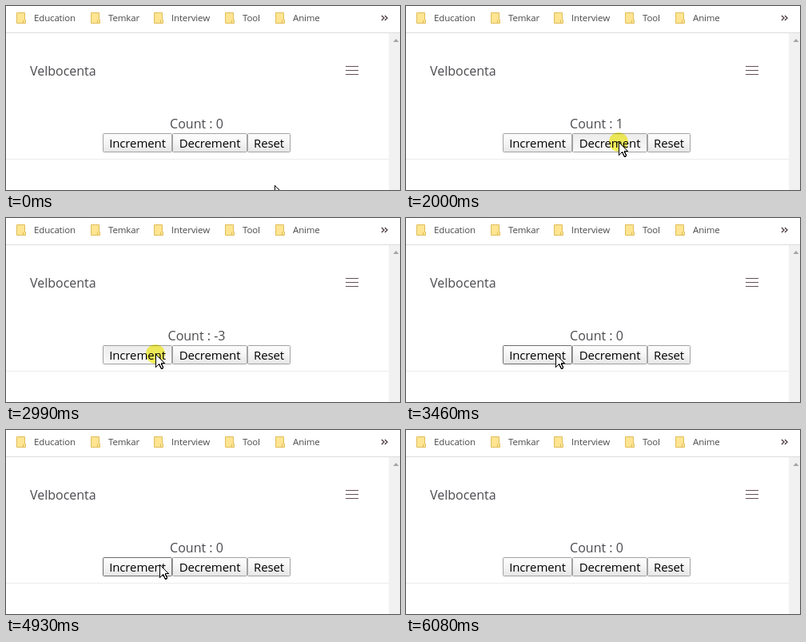
Recreate the animation shown at these times as an HTML page. Size 493 by 230 pixels, loop 6.48 s.

```html
<!DOCTYPE html>
<html lang="en">
<head>
<meta charset="utf-8">
<title>Counter</title>
<style>
  html, body { margin: 0; width: 100%; height: 100%; overflow: hidden; background: #fff; }
  svg { display: block; width: 493px; height: 230px; }
  text { font-family: "Open Sans", "Noto Sans", sans-serif; white-space: pre; }
  .bookmark text { font-size: 11.5px; letter-spacing: -.15px; fill: #4a4a4a; }
  .page { font-size: 16px; fill: #4b4b50; }
  .button text { font-size: 15px; letter-spacing: -.1px; text-anchor: middle; fill: #000; }
  .button rect { fill: url(#face); stroke: #a3a3a3; }
  .button.hover rect { stroke: #6e6e6e; }
  .button.down rect { fill: url(#pressed); stroke: #a0a0a0; }
  #glow { fill: #fbf75c; mix-blend-mode: multiply; }
</style>
</head>
<body>
<svg viewBox="0 0 493 230" xmlns="http://www.w3.org/2000/svg">
  <defs>
    <linearGradient id="face" x2="0" y2="1">
      <stop stop-color="#fcfcfc"/><stop offset=".4" stop-color="#f7f7f7"/><stop offset="1" stop-color="#e6e6e6"/>
    </linearGradient>
    <linearGradient id="pressed" x2="0" y2="1">
      <stop stop-color="#ececec"/><stop offset="1" stop-color="#f9f9f9"/>
    </linearGradient>
  </defs>
  <rect width="493" height="230" fill="#fff"/>
  <g id="bookmarks"></g>
  <path d="M470 12l3 3-3 3M474 12l3 3-3 3" fill="none" stroke="#5d5156" stroke-width="1.6"/>
  <path d="M0 33.5H493" stroke="#dcdcdc"/>
  <rect x="479" y="34" width="14" height="196" fill="#f1f1f1"/>
  <path d="M484.5 45L488 41L491.5 45Z" fill="#a3a3a3"/>
  <text class="page" x="30" y="87">Velbocenta</text>
  <path d="M425 75.5h16M425 80.5h16M425 85.5h16" stroke="#665054"/>
  <path d="M0 191.5H479" stroke="#ececec"/>
  <text class="page" id="count" x="238.5" y="153" text-anchor="middle"></text>
  <g id="buttons"></g>
  <circle id="glow" r="12"/>
  <path id="pointer" d="M.5 .5V16.5L4.5 12.5L7.5 18.5H8.5L9.5 16.5L7.5 12.5V11.5H11.5Z"
    fill="#fff" stroke="#000" shape-rendering="crispEdges"/>
</svg>
<script>
const LOOP = 6480, TICK = 77, LEAD = 21;
const $ = id => document.getElementById(id);

const bookmarks = [["Education", 35], ["Temkar", 128], ["Interview", 207], ["Tool", 296], ["Anime", 359]];
$("bookmarks").innerHTML = bookmarks.map(([name, x]) => `
  <g class="bookmark" transform="translate(${x - 22} 0)">
    <path d="M.5 8.5H10.5V17.5H11.5V21.5H.5Z" fill="#ffe492" stroke="#dfbd58"/>
    <path d="M8.5 17.5V21" stroke="#dfbd58"/>
    <text x="22" y="19">${name}</text>
  </g>`).join("");

const buttons = [
  { name: "Increment", left: 121, right: 208, apply: n => n + 1 },
  { name: "Decrement", left: 208, right: 302, apply: n => n - 1 },
  { name: "Reset", left: 302, right: 356, apply: () => 0 }
];
$("buttons").innerHTML = buttons.map(({ name, left, right }) => `
  <g class="button">
    <rect x="${left + .5}" y="159.5" width="${right - left - 1}" height="23" rx="1"/>
    <text x="${(left + right) / 2}" y="177">${name}</text>
  </g>`).join("");
const buttonNodes = [...document.querySelectorAll(".button")];

const isOver = ({ left, right }, { x, y }) => x >= left && x < right && y > 162 && y < 183;

// The session is acted out once, one state per tick
const states = [];
const now = { x: 336, y: 224, count: 0, down: false };

function wait(ticks = 1) {
  while (ticks-- > 0) states.push({ ...now });
}

function moveTo(x, y, ticks = 1) {
  const from = { ...now };
  for (let i = 1; i <= ticks; i++) {
    now.x = Math.round(from.x + (x - from.x) * i / ticks);
    now.y = Math.round(from.y + (y - from.y) * i / ticks);
    wait();
  }
}

function click(times = 1, hold = 1) {
  const button = buttons.find(b => isOver(b, now));
  for (let i = 0; i < times; i++) {
    now.down = true;
    wait(hold);
    now.down = false;
    now.count = button.apply(now.count);
    wait();
  }
}

wait();
moveTo(219, 192, 2);
wait();
moveTo(187, 181, 2);
click();
wait(2);
click(2);
wait();
click();

moveTo(266, 170);
click(3);
wait(2);
click(5);

moveTo(187, 170);
click(3);
wait();
click();
wait();
click(1, 2);
click(3);

moveTo(368, 139);
moveTo(312, 160, 2);
wait();
moveTo(330, 175);
click();

moveTo(192, 168, 2);
click(3);

moveTo(330, 168);
wait();
moveTo(330, 175);
click();
wait(2);
moveTo(377, 198);
moveTo(500, 240);

function render(t) {
  const tick = Math.floor((t + LEAD) / TICK);
  const state = states[Math.min(tick, states.length - 1)];
  const place = `translate(${state.x} ${state.y})`;

  $("count").textContent = `Count : ${state.count}`;
  $("pointer").setAttribute("transform", place);
  $("glow").setAttribute("transform", place);
  $("glow").style.display = state.down ? "" : "none";
  buttonNodes.forEach((node, i) => {
    const over = isOver(buttons[i], state);
    node.classList.toggle("hover", over);
    node.classList.toggle("down", over && state.down);
  });
}

const start = performance.now();
function frame() {
  render((performance.now() - start) % LOOP);
  requestAnimationFrame(frame);
}
frame();
</script>
</body>
</html>
```
